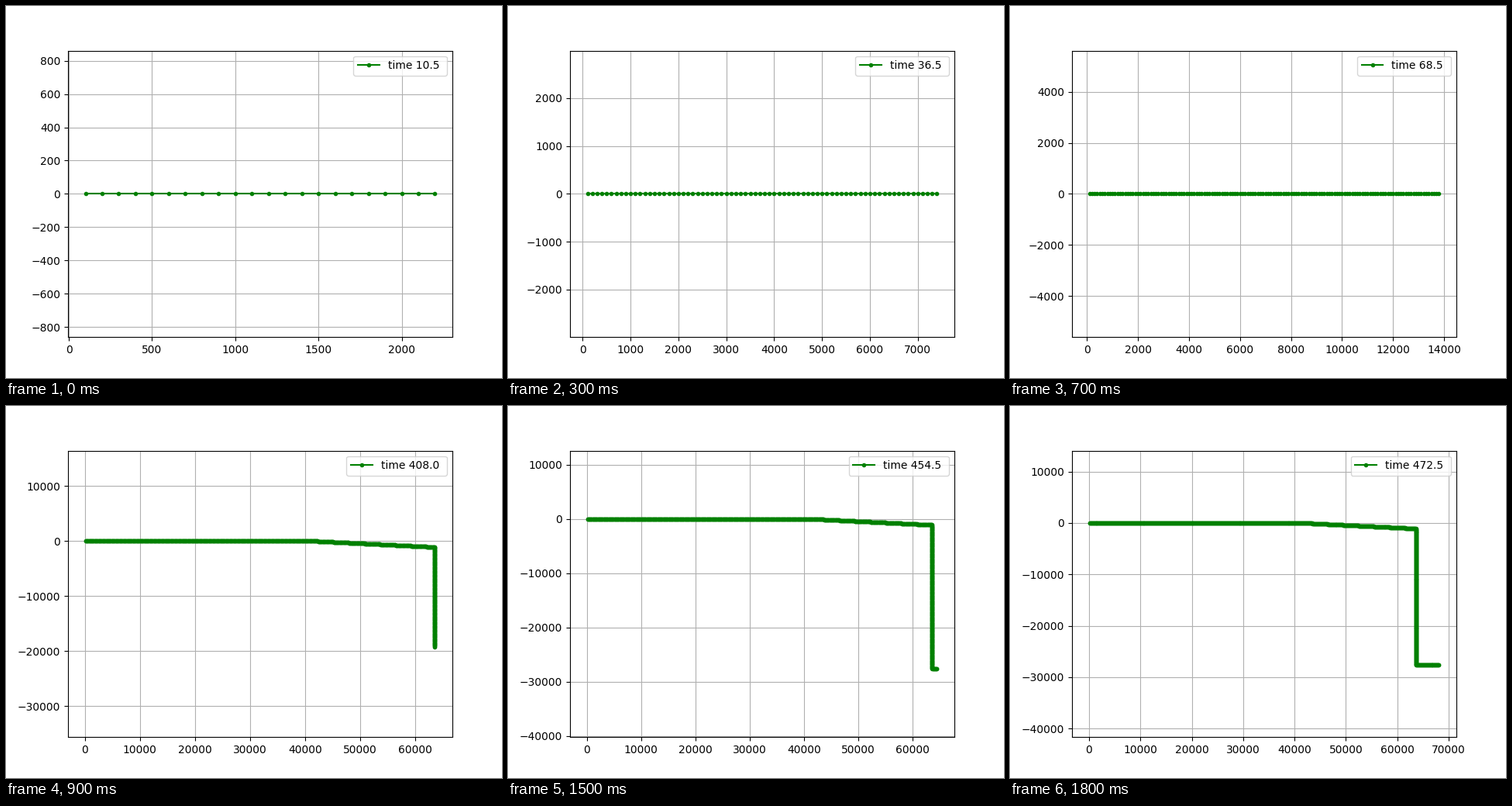
A matplotlib script for the animation above (1900 ms loop, 640 by 480 pixels).

```python
import numpy as np
import matplotlib.pyplot as plt
from matplotlib.animation import FuncAnimation

STEP = 100          # distance covered per sample
DT = 0.5            # time between samples
FLAT, RAMP, DROP = 416, 220, 265   # samples in each leg of the route
RAMP_FALL = 5       # descent per sample on the ramp

# Samples drawn at each tick; the run skips ahead once.
COUNTS = [22, 40, 57, 74, 90, 106, 122, 138, 155,
          817, 832, 846, 860, 877, 894, 910, 923, 936, 946]


def route(count):
    """Level flight, gentle descent, vertical drop, then level again."""
    k = np.arange(1, count + 1)
    top = FLAT + RAMP
    x = STEP * (np.minimum(k, top) + np.maximum(k - top - DROP, 0))
    y = (-RAMP_FALL * np.clip(k - FLAT, 0, RAMP)
         - STEP * np.clip(k - top, 0, DROP))
    return x, y


fig, ax = plt.subplots(figsize=(6.4, 4.8), dpi=100)


def update(i):
    count = COUNTS[i]
    ax.clear()
    x, y = route(count)
    # The trailing space pads the legend box.
    ax.plot(x, y, "g.-", label=f"time {(count - 1) * DT:.1f} ")
    ax.axis("equal")
    ax.grid(True)
    ax.legend(loc="upper right")
    return ax.lines


anim = FuncAnimation(fig, update, frames=len(COUNTS), interval=100,
                     repeat=True, repeat_delay=0)
plt.show()
```
